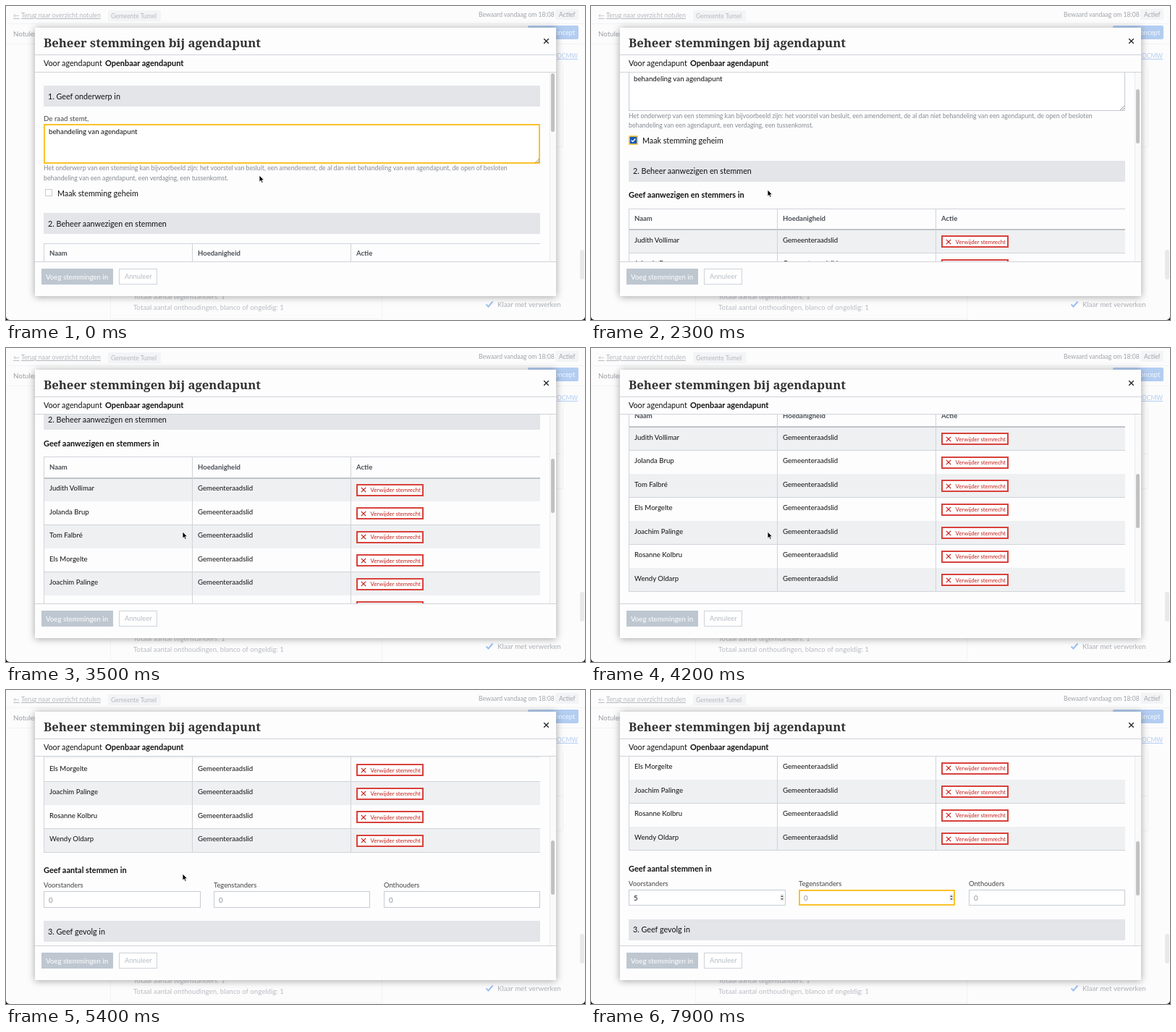
An HTML page for the animation above (8000 ms loop, 800x434 px).

```html
<!DOCTYPE html>
<html lang="nl">
<head>
<meta charset="utf-8">
<title>Beheer stemmingen</title>
<style>
html, body { margin: 0; width: 100%; height: 100%; overflow: hidden; background: #111; }
#stage { position: relative; width: 800px; height: 434px; overflow: hidden; background: #fcfcfd;
  border-radius: 0 0 5px 5px; font: 9.7px/12px Lato, "Open Sans", sans-serif; color: #111; }
#stage div, #stage svg { position: absolute; box-sizing: border-box; }
.text { white-space: pre; }
.large { font-size: 10.75px; }
.bold { font-weight: 700; font-size: 10.95px; }
.title { font: 700 16.7px/12px "Noto Serif", serif; color: #333; }
.help { font-size: 8.76px; color: #868b91; }
.head { font-weight: 700; font-size: 9.5px; color: #4a4f55; }
.small { font-size: 8.6px; color: #a0a4a8; }
.faint { color: #b9bcc1; }
.pale { color: #b4b8bc; }
.link { text-decoration: underline; }
.bar { background: #e3e5e9; }
.field { border: 1px solid #c6ccd3; background: #fff; }
.field.focus { border: 2px solid #fac22b; }
.line { background: #cfd3d8; }
.faintline { background: #f2f3f4; }
.red { color: #c21f1a; font-size: 7.85px; }
#body { inset: 0; clip-path: inset(92px 49px 81px 40px); }
#scroll, #table { left: 0; top: 0; width: 800px; height: 800px; }
</style>
</head>
<body>
<div id="stage"></div>
<script>
const stage = document.getElementById('stage');

function add(parent, html) {
  parent.insertAdjacentHTML('beforeend', html);
  return parent.lastElementChild;
}
const box = (parent, x, y, w, h, cls = '', style = '') =>
  add(parent, `<div class="${cls}" style="left:${x}px;top:${y}px;width:${w}px;height:${h}px;${style}"></div>`);
// y is the middle of the line
const text = (parent, x, y, str, cls = '', style = '') =>
  add(parent, `<div class="text ${cls}" style="left:${x}px;top:${y - 6}px;${style}">${str}</div>`);
const icon = (parent, x, y, w, h, shapes) =>
  add(parent, `<svg style="left:${x}px;top:${y}px" width="${w}" height="${h}" fill="none">${shapes}</svg>`);
const show = (el, on) => { el.style.display = on ? '' : 'none'; };

// Faded page behind the dialog
box(stage, 0, 24, 800, 1, 'faintline');
text(stage, 10, 13, '←', 'small faint link');
text(stage, 21, 13, 'Terug naar overzicht notulen', 'small pale link', 'font-size:8.8px');
box(stage, 141, 6, 73, 15, '', 'background:#f3f4f6;border-radius:2px');
text(stage, 145, 13.5, 'Gemeente Tumel', 'small pale', 'font-size:8.5px');
text(stage, 653, 12, 'Bewaard vandaag om 18:08', 'small');
box(stage, 759, 4, 32, 15, '', 'background:#f3f4f6;border-radius:2px');
text(stage, 764, 12, 'Actief', 'small');
text(stage, 10, 38, 'Notulen', '', 'color:#9b9fa4');
box(stage, 721, 27, 70, 19, '', 'background:#b3cdf1;border-radius:2px');
text(stage, 754, 37, 'concept', '', 'color:#f6f9fe;font-size:9.2px');
box(stage, 0, 52, 800, 1, 'faintline');
text(stage, 761, 69, 'OCMW', 'link', 'color:#b3cdf1;font-size:8.5px');
box(stage, 769, 83, 1, 111, 'faintline');
box(stage, 758, 146, 12, 1, 'faintline');
box(stage, 758, 194, 12, 1, 'faintline');
box(stage, 144, 395, 1, 39, 'faintline');
box(stage, 519, 395, 1, 39, 'faintline');
box(stage, 144, 432, 376, 1, 'faintline');
text(stage, 176, 401, 'Totaal aantal tegenstanders: 1', 'faint');
text(stage, 176, 415.5, 'Totaal aantal onthoudingen, blanco of ongeldig: 1', 'faint');
icon(stage, 662, 406, 12, 12, '<path d="M1.5 6.5l3 3 6-7" stroke="#9fc0ee" stroke-width="2"/>');
text(stage, 679, 412, 'Klaar met verwerken', '', 'color:#abafb3');
box(stage, 793, 337, 6, 41, '', 'background:#e9e9ea;border-radius:3px');

// Dialog frame
box(stage, 40, 30, 720, 371, '', 'background:#fdfdfe;box-shadow:0 1px 10px rgba(0,0,0,.36)');
text(stage, 52, 51, 'Beheer stemmingen bij agendapunt', 'title');
icon(stage, 742, 44, 9, 9, '<path d="M1.2 1.2l6.6 6.6M7.8 1.2l-6.6 6.6" stroke="#222" stroke-width="1.3"/>');
box(stage, 40, 67, 720, 1, 'line');
text(stage, 52, 79, 'Voor agendapunt', 'large');
text(stage, 137, 79, 'Openbaar agendapunt', 'bold');
box(stage, 40, 91, 720, 1, 'line');
box(stage, 40, 353, 720, 1, 'line');
box(stage, 49, 363, 99, 22, '', 'background:#bec7d0');
text(stage, 55, 374, 'Voeg stemmingen in', '', 'color:#fff');
box(stage, 156, 363, 53, 22, 'field', 'border-color:#cdd3d9');
text(stage, 164, 374, 'Annuleer', '', 'color:#b4bcc4;font-size:9.4px');
box(stage, 751, 92, 9, 261, '', 'background:#fafafa;border-left:1px solid #ececec');
const thumb = box(stage, 753, 93, 5, 75, '', 'background:#c1c1c2;border-radius:3px');

// Scrolling form
const body = add(stage, '<div id="body"></div>');
const scroll = add(body, '<div id="scroll"></div>');

function section(y, title) {
  box(scroll, 52, y, 686, 29, 'bar');
  text(scroll, 58, y + 14.5, title, 'large');
}
section(110, '1. Geef onderwerp in');
text(scroll, 52, 154.5, 'De raad stemt,', '', 'color:#444');
const area = box(scroll, 52, 162.5, 686, 55, 'field');
text(scroll, 59, 172.5, 'behandeling van agendapunt', '', 'font-size:9.75px');
icon(scroll, 731, 210.5, 6, 6, '<path d="M0 6L6 0M3 6L6 3" stroke="#777" stroke-width=".8"/>');
text(scroll, 52, 224, 'Het onderwerp van een stemming kan bijvoorbeeld zijn: het voorstel van besluit, een amendement, ' +
  'de al dan niet behandeling van een agendapunt, de open of besloten', 'help');
text(scroll, 52, 237.5, 'behandeling van een agendapunt, een verdaging, een tussenkomst.', 'help');
const unchecked = box(scroll, 53.5, 252.5, 10, 10, 'field');
const checked = icon(scroll, 52, 251, 13, 13,
  '<rect x="1" y="1" width="11" height="11" fill="#1257bd" stroke="#fac22b" stroke-width="1.6"/>' +
  '<path d="M3.7 6.6l2 2 3.7-4" stroke="#fff" stroke-width="1.4"/>');
text(scroll, 71, 258.5, 'Maak stemming geheim', 'large');
section(286, '2. Beheer aanwezigen en stemmen');
const presentTitle = text(scroll, 52, 333.5, 'Geef aanwezigen en stemmers in', 'bold');

const table = add(scroll, '<div id="table"></div>');
const members = ['Judith Vollimar', 'Jolanda Brup', 'Tom Falbré', 'Els Morgelte',
  'Joachim Palinge', 'Rosanne Kolbru', 'Wendy Oldarp'];
const top0 = 381.5, rowH = 32.5;
box(table, 52, 352, 686, 1, 'line');
[['Naam', 60], ['Hoedanigheid', 265], ['Actie', 484]].forEach(([name, x]) => text(table, x, 366.5, name, 'head'));
members.forEach((name, i) => {
  const y = top0 + rowH * i, mid = y + 14.5;
  box(table, 52, y, 686, rowH, '', `background:${i % 2 ? '#fdfdfe' : '#eff0f2'}`);
  box(table, 52, y + rowH - .5, 686, 1, 'line');
  text(table, 60, mid, name, '', 'font-size:9.6px');
  text(table, 265, mid, 'Gemeenteraadslid', '', 'font-size:9.6px');
  box(table, 484, mid - 6.5, 93, 17, '', 'border:2px solid #d8413b;background:#fff');
  icon(table, 490, mid - 2, 8, 8, '<path d="M.8.8l6.4 6.4M7.2.8L.8 7.2" stroke="#c21f1a" stroke-width="1.2"/>');
  text(table, 503.5, mid + 2, 'Verwijder stemrecht', 'red');
});
box(table, 52, top0 - 1, 686, 2, '', 'background:#c0c3c8');
[52, 257, 476].forEach(x => box(table, x, 352, 1, 257, 'line'));

text(scroll, 52, 634, 'Geef aantal stemmen in', 'bold');
const fields = [['Voorstanders', 52, 217], ['Tegenstanders', 287, 216], ['Onthouders', 522, 216]].map(([name, x, w]) => {
  text(scroll, x, 655, name, '', 'font-size:9.4px;color:#444');
  return {
    x, w,
    frame: box(scroll, x, 663, w, 22.5, 'field'),
    value: text(scroll, x + 7, 674.5, '0'),
    spinner: icon(scroll, x + w - 8, 669.5, 6, 10,
      '<rect width="6" height="10" rx="2" fill="#ececec"/><path d="M1.2 4L3 1.7 4.8 4zM1.2 6L3 8.3 4.8 6z" fill="#555"/>')
  };
});
section(704, '3. Geef gevolg in');

const cursor = icon(stage, 0, 0, 10, 14,
  '<path d="M1 1v9.2l2.1-1.9 1.4 3.2 1.6-.7-1.4-3.1h2.8z" fill="#000" stroke="#fff" stroke-width=".8"/>');

// Motion, as [time, value...] points
const scrollPath = [[1550, 0], [2300, 72.5], [3000, 151.5], [4200, 272.5], [5400, 385], [5600, 387.5]];
const cursorPath = [[0, 350, 234], [700, 172, 258], [1150, 172, 258], [1600, 244, 254], [5600, 244, 254], [6200, 200, 286]];
const CHECK = 800, FOCUS = 6400, TYPE = 6800, TAB = 7200, LOOP = 8000;

function along(path, t, ease = k => k) {
  const i = path.findIndex(p => p[0] > t);
  if (i < 0) return path[path.length - 1].slice(1);
  if (i === 0) return path[0].slice(1);
  const a = path[i - 1], b = path[i], k = ease((t - a[0]) / (b[0] - a[0]));
  return a.slice(1).map((v, j) => v + (b[j + 1] - v) * k);
}

function draw(t) {
  const secret = t >= CHECK;
  const [s] = along(scrollPath, t);
  const [cx, cy] = along(cursorPath, t, k => k * k * (3 - 2 * k));

  scroll.style.top = -s + 'px';
  thumb.style.top = 93 + s * .2985 + 'px';
  thumb.style.height = (secret ? 75 : 81) + 'px';

  area.classList.toggle('focus', !secret);
  show(unchecked, !secret);
  show(checked, secret);
  show(presentTitle, secret);
  table.style.top = secret ? '0' : '-24.5px';

  const active = t < FOCUS ? -1 : t < TAB ? 0 : 1;
  fields.forEach((f, i) => {
    const hover = cx > f.x && cx < f.x + f.w && Math.abs(cy + s - 674) < 11;
    const typed = i === 0 && t >= TYPE;
    f.frame.classList.toggle('focus', i === active);
    f.value.textContent = typed ? '5' : '0';
    f.value.style.color = typed ? '#111' : '#8a8f95';
    show(f.spinner, hover || i === active);
  });

  cursor.style.left = cx - 1 + 'px';
  cursor.style.top = cy - 1 + 'px';
  show(cursor, t < TYPE);
}

const start = performance.now();
function tick() {
  const t = (performance.now() - start) % LOOP;
  draw(Math.floor(t / 100) * 100);
  requestAnimationFrame(tick);
}
tick();
</script>
</body>
</html>
```
